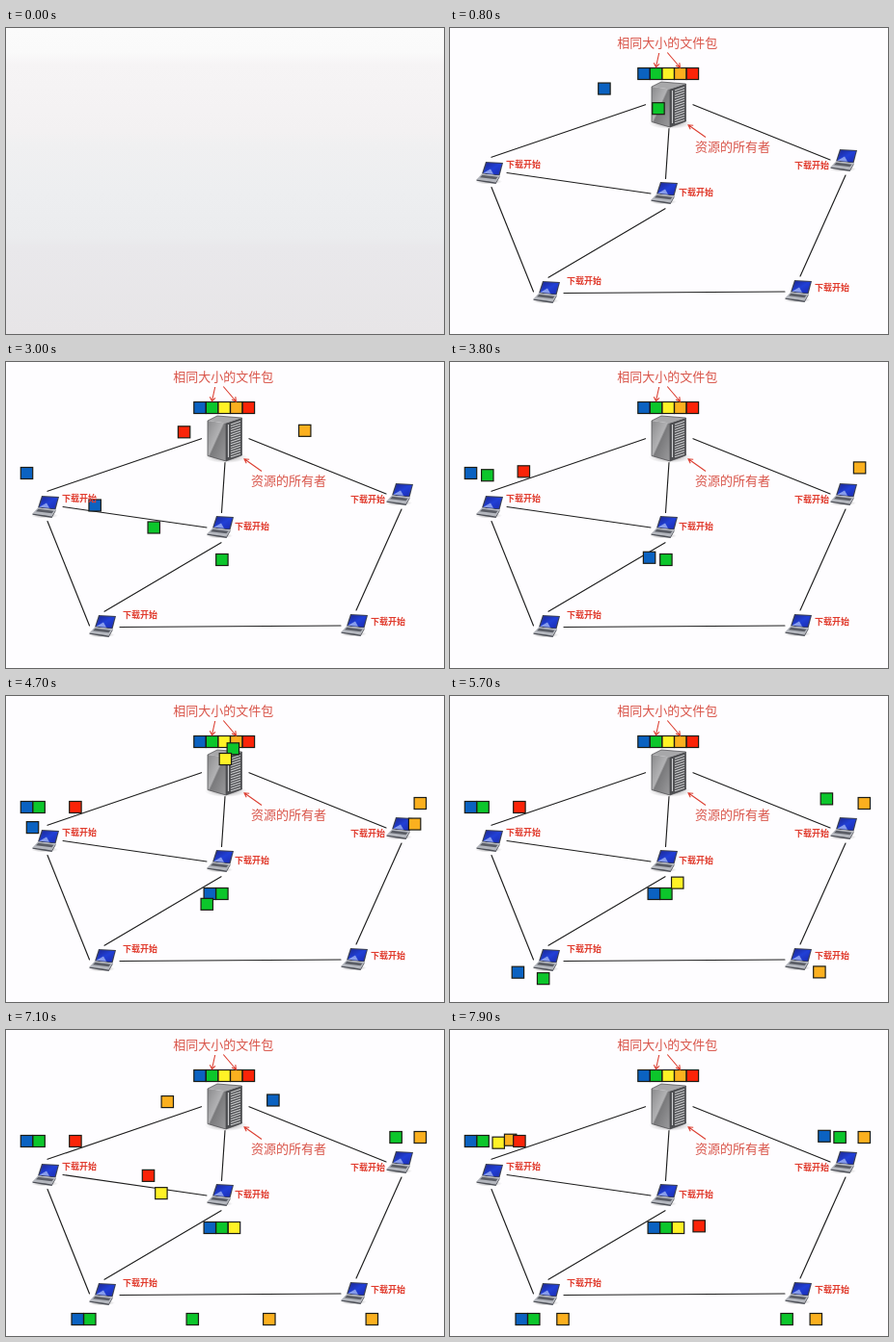
Animation, 454 px wide and 318 px high, one loop 8 s. Source, as an HTML page:

```html
<!DOCTYPE html>
<html lang="zh">
<head>
<meta charset="utf-8">
<title>File sharing between peers</title>
<style>
  html, body { margin: 0; width: 100%; height: 100%; overflow: hidden; background: #fefdff; }
  svg { display: block; width: 454px; height: 318px; }
  text { font-family: "Noto Sans CJK SC", "Noto Sans CJK", "Noto Sans CJK JP", sans-serif; }
  .title { font-size: 13px; fill: #d9554a; }
  .label { font-size: 9px; font-weight: 700; fill: #e03a2c; }
  .links { stroke: #1e1e1e; stroke-width: 1.15; fill: none; stroke-linecap: round; }
  .arrows { stroke: #dc3f32; stroke-width: 1.1; fill: none; }
  .block { stroke: #1c1c14; stroke-width: 1.2; }
</style>
</head>
<body>
<svg viewBox="0 0 454 318">
  <defs>
    <linearGradient id="sky" x2="0" y2="1">
      <stop offset="0" stop-color="#fbfbfb"/>
      <stop offset=".08" stop-color="#fafafa"/>
      <stop offset=".12" stop-color="#f6f4f5"/>
      <stop offset=".34" stop-color="#f3f1f2"/>
      <stop offset=".38" stop-color="#f0f0f1"/>
      <stop offset=".54" stop-color="#edeef0"/>
      <stop offset=".68" stop-color="#ebecee"/>
      <stop offset=".72" stop-color="#e9e8eb"/>
      <stop offset="1" stop-color="#e7e5e7"/>
    </linearGradient>
    <linearGradient id="screen" x2="1" y2="1">
      <stop offset="0" stop-color="#1a2590"/>
      <stop offset=".5" stop-color="#2140d6"/>
      <stop offset="1" stop-color="#1b2bb0"/>
    </linearGradient>
    <linearGradient id="side" x2="1" y2="1">
      <stop offset="0" stop-color="#8a8a8c"/>
      <stop offset=".45" stop-color="#b2b2b4"/>
      <stop offset=".5" stop-color="#7a7a7c"/>
      <stop offset="1" stop-color="#9b9b9d"/>
    </linearGradient>
    <radialGradient id="shade">
      <stop offset="0" stop-color="#666" stop-opacity=".8"/>
      <stop offset="1" stop-color="#999" stop-opacity="0"/>
    </radialGradient>
    <g id="laptop">
      <ellipse cx="-2" cy="9.5" rx="14" ry="3" fill="url(#shade)"/>
      <path d="M-5-11 13-10 9.500 3.500-9 1.500Z" fill="#3c4152"/>
      <path d="M-4-10 11.800-9 8.500 2.500-7.500.7Z" fill="url(#screen)"/>
      <path d="M-7.500.7 0-3.500 3 1.800Z" fill="#a9bcf4" opacity=".75"/>
      <path d="M-9 1.500 9.500 3.500 5.500 10.500-14.500 7.500Z" fill="#b4b7be"/>
      <path d="M-8.500 2.800 7.500 4.700 5.500 7.300-11 5.200Z" fill="#5b5e66"/>
      <path d="M-14.500 7.500 5.500 10.500 9.500 3.500V5L5.500 12-14.500 8.800Z" fill="#4c4f57"/>
    </g>
  </defs>

  <rect width="454" height="318" fill="#fefdff"/>
  <path class="links" d="M202.500 79.700 43 134.300M227 104.500 223.500 156.500M252 79.700 394 137M59 150.500 208 172M43 165.500 86.500 274M223 187.700 102 259.200M118 275.500 347 274M410 153 363 258"/>

  <g id="server">
    <ellipse cx="228" cy="99" rx="22" ry="6" fill="url(#shade)"/>
    <path d="M209 61 219 56 244.500 58 228 63.500Z" fill="#a8a8aa"/>
    <path d="M209 61 228 63.500V103L209 97.500Z" fill="url(#side)"/>
    <path d="M228 63.500 244.500 58V97L228 103Z" fill="#4e4f52"/>
    <path id="vents" stroke="#d0d1d3" stroke-width="1.1" fill="none"/>
    <path d="M209 61 219 56 244.500 58V97L228 103 209 97.500ZM228 63.500V103" fill="none" stroke="#48484b" stroke-width=".7"/>
  </g>

  <g id="laptops"></g>
  <g id="blocks"></g>
  <path class="arrows" d="M216.700 26 213.500 40.500M211.300 36.300 213.500 40.500 217 37.300M225.300 25.500 238.500 41M234 39 238.500 41 237.800 36.200M265 113.500 247 100.800M249.200 105.300 247 100.800 252.200 101.200"/>
  <text class="title" x="173.300" y="19.500">相同大小的文件包</text>
  <text class="title" x="254" y="128">资源的所有者</text>
  <g id="labels"></g>
  <rect id="cover" width="454" height="318" fill="url(#sky)"/>
</svg>

<script>
const LOOP = 8000, STEP = 100, COVER = 100;
const FIRST = 208, ROUND = 2037, TRAVEL = 1750;
const SLOT = 12.6;
const colors = ["#0b62c1", "#0cc62b", "#fff226", "#fbb01f", "#fb2408"];
const [BLUE, GREEN, YELLOW, ORANGE, RED] = [0, 1, 2, 3, 4];

// Left end of each node's row of blocks.
const rows = {
  server: [194.5, 41], left: [15, 109], middle: [204.8, 199],
  right: [385, 105], lowLeft: [67.7, 294], lowRight: [335, 294]
};

// Each round: colour, sender, receiver.
const rounds = [
  [[BLUE, "server", "left"], [GREEN, "server", "middle"]],
  [[RED, "server", "left"], [ORANGE, "server", "right"],
   [BLUE, "left", "middle"], [GREEN, "middle", "left"]],
  [[BLUE, "left", "lowLeft"], [GREEN, "middle", "lowLeft"], [GREEN, "server", "right"],
   [YELLOW, "server", "middle"], [ORANGE, "right", "lowRight"]],
  [[ORANGE, "server", "left"], [BLUE, "server", "right"], [RED, "left", "middle"],
   [YELLOW, "middle", "left"], [GREEN, "lowLeft", "lowRight"], [ORANGE, "lowRight", "lowLeft"]]
];

const byId = id => document.getElementById(id);

function add(parent, tag, attrs) {
  const el = document.createElementNS("http://www.w3.org/2000/svg", tag);
  for (const key in attrs) el.setAttribute(key, attrs[key]);
  return byId(parent).appendChild(el);
}

const addBlock = color => add("blocks", "rect",
  { class: "block", x: 0.3, y: 0.5, width: 12.4, height: 12, fill: colors[color] });

const place = (el, x, y) => el.setAttribute("transform", `translate(${x.toFixed(2)} ${y.toFixed(2)})`);

let vents = "";
for (let y = 65; y < 99; y += 2.6) vents += `M233 ${y}L243 ${y - 3.4}`;
byId("vents").setAttribute("d", vents + "M230.500 65V99");

// Laptop centre, then label position.
[[42, 150, 58, 144.5], [223, 171, 237, 173.5], [409, 137, 357, 146],
 [101, 274, 121, 265.5], [362, 273, 378, 272.5]].forEach(([x, y, tx, ty]) => {
  add("laptops", "use", { href: "#laptop", x, y });
  add("labels", "text", { class: "label", x: tx, y: ty }).textContent = "下载开始";
});

colors.forEach((_, i) => place(addBlock(i), rows.server[0] + SLOT * i, rows.server[1]));

const moves = rounds
  .flatMap((list, i) => list.map(([color, from, to]) =>
    ({ color, from: rows[from], to: rows[to], start: FIRST + ROUND * i })))
  .sort((a, b) => a.color - b.color);
for (const move of moves) move.el = addBlock(move.color);

function ease(u) {
  const t = Math.min(1, Math.max(0, u));
  return t < 0.5 ? 2 * t * t : 1 - 2 * (1 - t) ** 2;
}

function draw(time) {
  byId("cover").style.display = time < COVER ? "" : "none";
  for (const { el, color, from, to, start } of moves) {
    el.style.display = time < start ? "none" : "";
    const p = ease((time - start) / TRAVEL);
    place(el, from[0] + (to[0] - from[0]) * p + SLOT * color, from[1] + (to[1] - from[1]) * p);
  }
}

const origin = performance.now();
function tick() {
  const time = (performance.now() - origin) % LOOP;
  draw(Math.floor(time / STEP) * STEP);
  requestAnimationFrame(tick);
}
tick();
</script>
</body>
</html>
```
